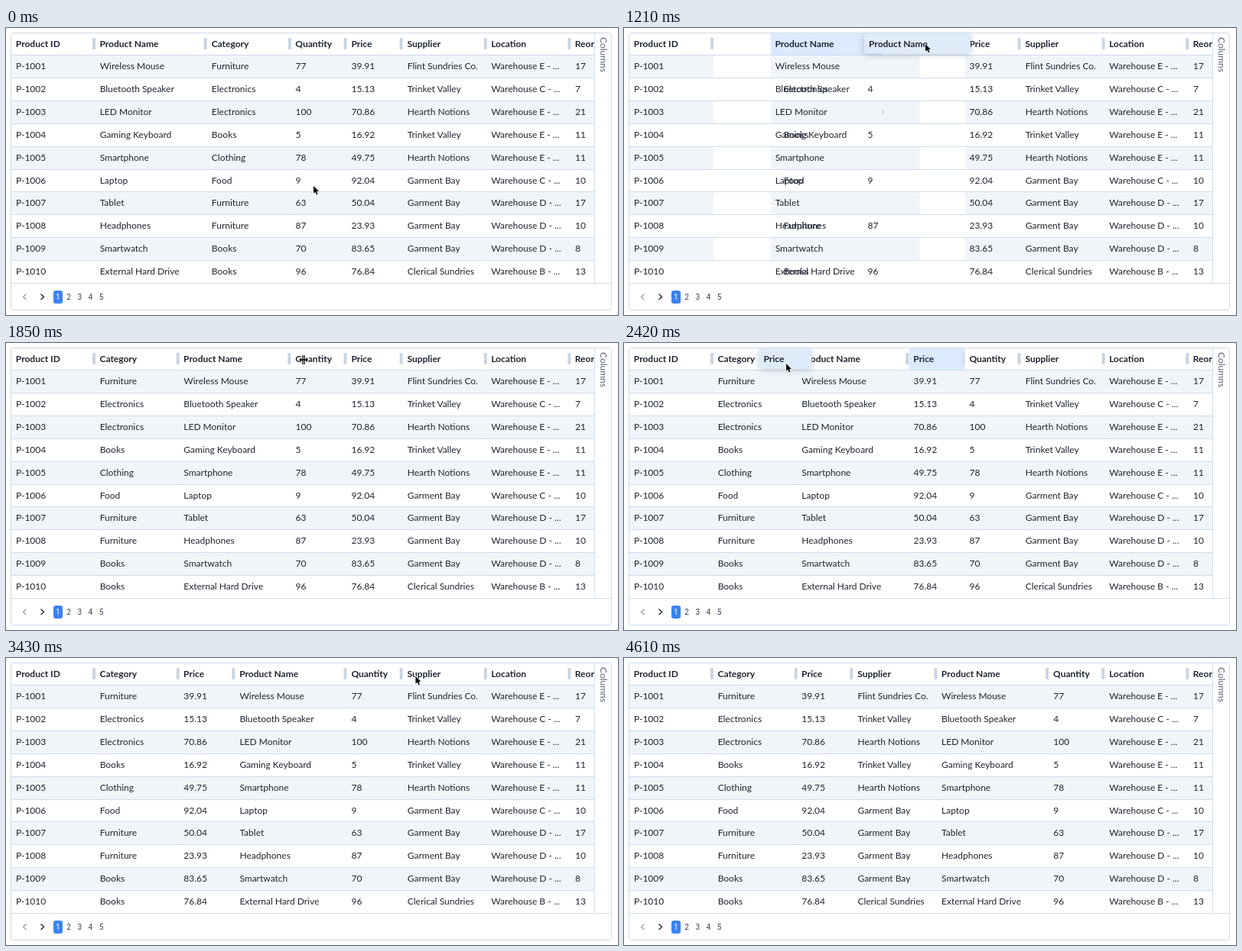
These frames come from a looping animation (800x376 px, 4890 ms). An HTML page:

```html
<!DOCTYPE html>
<html lang="en">
<head>
<meta charset="utf-8">
<title>Column reordering</title>
<style>
  html, body { margin: 0; width: 100%; height: 100%; overflow: hidden; background: #fff; }
  #stage { position: relative; width: 800px; height: 376px; overflow: hidden; font: 12px Lato, sans-serif; color: #1e2531; white-space: nowrap; cursor: default; }
  #stage div, #stage svg { position: absolute; box-sizing: border-box; }
  #frame { left: 6px; top: 6px; width: 786px; height: 364px; border: 1px solid #cddaea; border-radius: 4px; }
  #view { left: 7px; top: 7px; width: 762px; height: 328px; overflow: hidden; isolation: isolate; }
  .col { top: 0; height: 328px; }
  .head { left: 0; top: 0; width: 100%; height: 28px; padding-left: 5.8px; line-height: 28px; font-weight: 700; }
  .head::after { content: ""; position: absolute; right: 0; top: 6px; width: 4px; height: 15px; border-radius: 1px; background: #cbd5e1; }
  .drag .head { background: #dbeafe; }
  .drag .head::after { opacity: .6; }
  .cell { left: 0; width: calc(100% + .6px); height: 30px; padding-left: 6px; line-height: 29px; }
  .odd { background: #f1f5fa; }
  .line { left: 7px; width: 762px; height: 1px; background: #cddcec; }
  #side { left: 769px; top: 7px; width: 1px; height: 328px; background: #d5e0ed; }
  #tab { left: 772px; top: 12px; width: 18px; line-height: 18px; writing-mode: vertical-rl; color: #596273; }
  .page { top: 344px; width: 12px; height: 17px; border-radius: 3px; text-align: center; font: 10px/17px Roboto, sans-serif; color: #3b4250; }
  .page.on { background: #3b82f6; color: #fff; }
  #ghost { left: 0; top: 0; height: 27px; padding-left: 6px; line-height: 27px; font-weight: 700; border-radius: 4px; background: #e0ebf9; box-shadow: 0 2px 8px rgba(60, 85, 120, .28); }
  #stage svg { left: 0; top: 0; overflow: visible; }
</style>
</head>
<body>
<div id="stage">
  <div id="frame"></div>
  <div id="view"></div>
  <div id="side"></div>
  <div id="tab">Columns</div>
  <svg width="1" height="1" fill="none" stroke-width="1.4">
    <path d="M26.5 348.5l-4 3.8 4 3.8" stroke="#9aa1ac"/>
    <path d="M45.5 348.5l4 3.8-4 3.8" stroke="#262c38"/>
  </svg>
  <div id="ghost"></div>
  <svg id="arrow" width="1" height="1">
    <path d="M0 0V9.8L2.2 7.7 3.7 11.2 5.5 10.4 4 7.1H7Z" stroke="#fff" stroke-width="1.4" paint-order="stroke" stroke-linejoin="round"/>
  </svg>
  <svg id="resize" width="1" height="1">
    <path d="M-1.7-6V6H-.5V.8H.5V6H1.7V.8H3V3L6 0 3-3V-.8H1.7V-6H.5V-.8H-.5V-6H-1.7V-.8H-3V-3L-6 0-3 3V.8H-1.7Z" stroke="#fff" stroke-width="1.4" paint-order="stroke"/>
  </svg>
</div>
<script>
const LOOP = 4890, UNIT = 73.1, ROW = 29.9, SLIDE = 200;
const $ = id => document.getElementById(id);
const pick = (keys, names) => [...keys].map(k => names[k]);

const ids = Array.from({ length: 10 }, (_, i) => 'P-' + (1001 + i));
const products = 'Wireless Mouse,Bluetooth Speaker,LED Monitor,Gaming Keyboard,Smartphone,Laptop,Tablet,Headphones,Smartwatch,External Hard Drive'.split(',');
const kinds = { f: 'Furniture', e: 'Electronics', b: 'Books', c: 'Clothing', o: 'Food' };
const firms = { t: 'Flint Sundries Co.', g: 'Trinket Valley', h: 'Hearth Notions', f: 'Garment Bay', o: 'Clerical Sundries' };

// key: title, width in units, cell values
const table = {
  I: ['Product ID', 1.5, ids],
  N: ['Product Name', 2, products],
  C: ['Category', 1.5, pick('feebcoffbb', kinds)],
  Q: ['Quantity', 1, '77 4 100 5 78 9 63 87 70 96'.split(' ')],
  P: ['Price', 1, '39.91 15.13 70.86 16.92 49.75 92.04 50.04 23.93 83.65 76.84'.split(' ')],
  S: ['Supplier', 1.5, pick('tghghffffo', firms)],
  L: ['Location', 1.5, [...'ECEEECDDDB'].map(c => `Warehouse ${c} - ...`)],
  R: ['Reorder Level', 1.5, '17 7 21 11 11 10 17 10 8 13'.split(' ')]
};

// start time and column order
const orders = [
  [-SLIDE, 'INCQPSLR'], [1123, 'ICQNPSLR'], [1400, 'ICNQPSLR'],
  [2200, 'ICNPQSLR'], [2450, 'IPCNQSLR'], [2863, 'ICPNQSLR'],
  [3665, 'ICPNSQLR'], [3900, 'ICPSNQLR']
];

// start, end, column, grab offset
const drags = [[930, 1600, 'N', 80], [2090, 3160, 'P', 35.5], [3640, 4130, 'S', 53.5]];

// time, x, y of the pointer
const pointer = [
  [40, 402, 207], [320, 215, 40], [500, 215, 40], [780, 180, 22], [920, 180, 22],
  [1210, 394, 21], [1300, 404, 22], [1480, 310, 24], [1700, 310, 22], [1850, 389, 22],
  [2010, 478, 24], [2090, 478, 24], [2420, 212, 27], [2560, 160, 25], [2700, 165, 24],
  [2900, 283, 24], [2980, 300, 24], [3200, 300, 24], [3500, 572, 24], [3640, 572, 24],
  [3870, 380, 22], [3970, 363, 23], [4490, 363, 23], [4610, 367, 380], [LOOP, 367, 380]
];

function add(parent, cls, text = '', style = {}) {
  const el = document.createElement('div');
  el.className = cls;
  el.textContent = text;
  Object.assign(el.style, style);
  parent.append(el);
  return el;
}

const cols = {};
for (const key in table) {
  const [title, size, values] = table[key];
  const col = cols[key] = add($('view'), 'col', '', { width: size * UNIT + 'px' });
  add(col, 'head', title);
  values.forEach((v, i) => add(col, i % 2 ? 'cell' : 'cell odd', v, { top: Math.round(28 + ROW * i) + 'px' }));
}
for (let i = 0; i < 11; i++) add($('stage'), 'line', '', { top: Math.round(35 + ROW * i) + 'px' });
$('stage').lastChild.style.width = '785px';
for (let i = 0; i < 5; i++) add($('stage'), i ? 'page' : 'page on', i + 1, { left: 61.8 + 14.2 * i + 'px' });
$('stage').append($('ghost'), $('arrow'), $('resize'));

const move = (el, x, y) => { el.style.transform = `translate(${x}px, ${y}px)`; };
const show = (el, on) => { el.style.visibility = on ? 'visible' : 'hidden'; };
const mix = (a, b, k) => a + (b - a) * k;
const ease = u => { u = Math.min(1, Math.max(0, u)); return u * u * (3 - 2 * u); };

function lefts(order) {
  const out = {};
  let x = 0;
  for (const k of order) { out[k] = x; x += table[k][1] * UNIT; }
  return out;
}
const layouts = orders.map(([t, order]) => [t, lefts(order)]);

function pointerAt(t) {
  const i = pointer.findIndex(p => p[0] > t);
  if (i < 1) return pointer[0].slice(1);
  const [t0, x0, y0] = pointer[i - 1], [t1, x1, y1] = pointer[i];
  const u = (t - t0) / (t1 - t0), k = t0 === 4490 ? u : ease(u);
  return [mix(x0, x1, k), mix(y0, y1, k)];
}

function draw(t) {
  const n = layouts.filter(l => l[0] <= t).length - 1;
  const [start, to] = layouts[n], from = layouts[Math.max(0, n - 1)][1];
  const k = ease((t - start) / SLIDE);
  const drag = drags.find(d => t >= d[0] && t < d[1]);
  for (const key in cols) {
    const held = !!drag && drag[2] === key;
    move(cols[key], mix(from[key], to[key], k), 0);
    cols[key].classList.toggle('drag', held);
    cols[key].style.zIndex = held ? 1 : 0;
  }

  const [x, y] = pointerAt(t), resizing = t >= 1830 && t < 1890;
  move($('arrow'), x, y);
  move($('resize'), x, y);
  show($('arrow'), !resizing);
  show($('resize'), resizing);

  show($('ghost'), drag);
  if (drag) {
    const [title, size] = table[drag[2]];
    $('ghost').textContent = title;
    $('ghost').style.width = size * UNIT * .95 + 'px';
    move($('ghost'), x - drag[3], 6.5);
  }
}

const begin = performance.now();
function tick() {
  draw((performance.now() - begin) % LOOP);
  requestAnimationFrame(tick);
}
tick();
</script>
</body>
</html>
```
